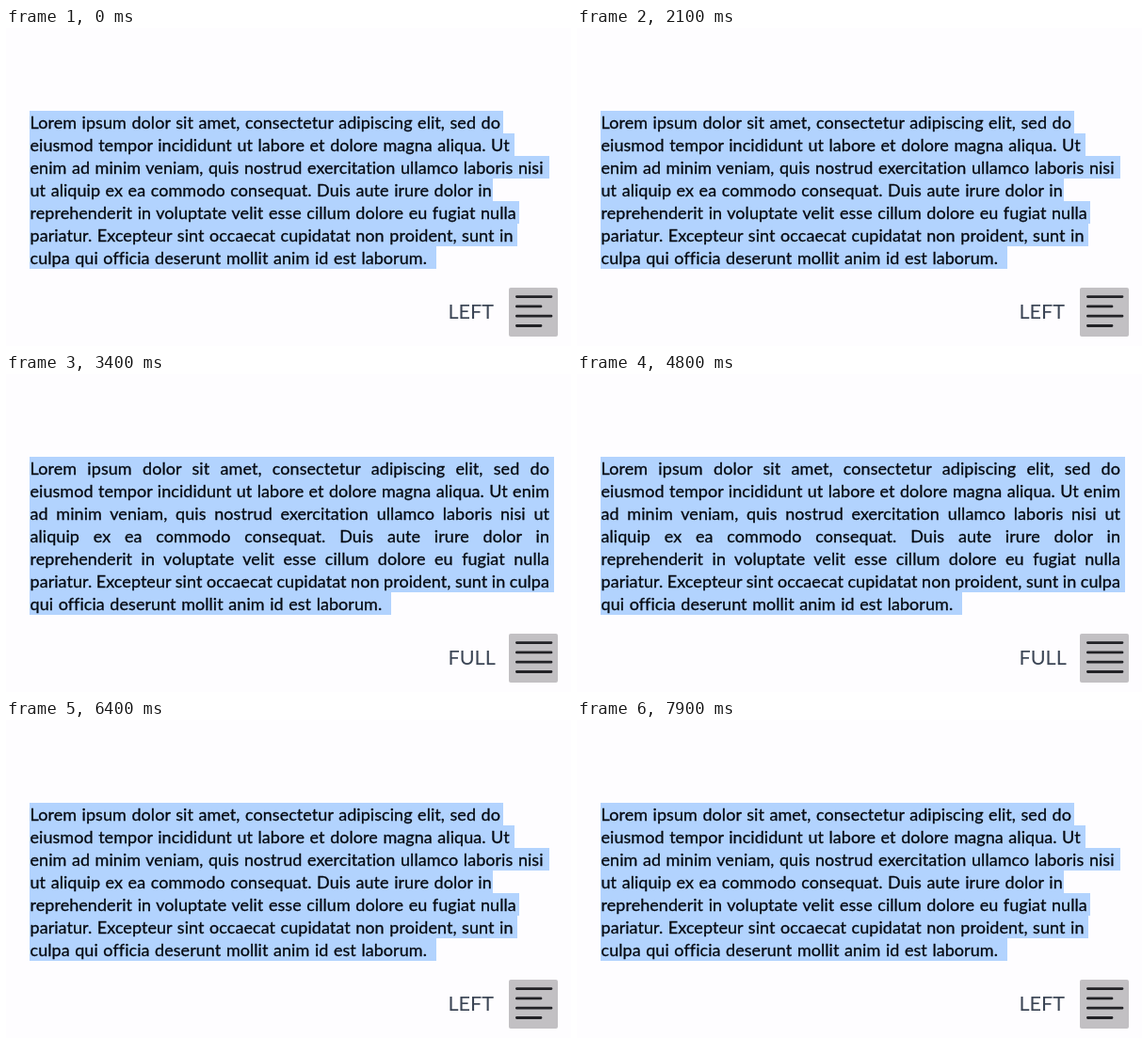
These frames come from a looping animation (600 px wide and 338 px high, 8000 ms). An HTML page:

```html
<!DOCTYPE html>
<html lang="en">
<head>
<meta charset="utf-8">
<title>Text alignment</title>
<style>
html, body { margin: 0; width: 100%; height: 100%; overflow: hidden; background: #fefdff; }
#stage { position: relative; width: 600px; height: 338px; }
.line {
  position: absolute; left: 25px; height: 24px; padding-left: .5px; box-sizing: border-box;
  background: #b2d3fe; color: #060a12; white-space: nowrap;
  font: 18px/24px Lato, sans-serif; letter-spacing: .05px; word-spacing: .9px;
  -webkit-text-stroke: .3px #060a12;
}
.line span { display: block; }
.justify span { width: 551.5px; text-align-last: justify; word-spacing: -3px; }
#label { position: absolute; left: 469.5px; top: 288px; font: 21.6px/27px Lato, sans-serif; color: #3b4555; }
svg { position: absolute; left: 534px; top: 276px; }
</style>
</head>
<body>
<div id="stage">
  <div id="text"></div>
  <div id="label"></div>
  <svg width="52" height="52">
    <rect width="52" height="52" rx="2" fill="#c2c0c3"/>
    <path id="bars" stroke="#222226" stroke-width="2.8" stroke-linecap="round"/>
  </svg>
</div>
<script>
const $ = id => document.getElementById(id);
const words = ("Lorem ipsum dolor sit amet, consectetur adipiscing elit, sed do eiusmod tempor " +
  "incididunt ut labore et dolore magna aliqua. Ut enim ad minim veniam, quis nostrud exercitation " +
  "ullamco laboris nisi ut aliquip ex ea commodo consequat. Duis aute irure dolor in reprehenderit " +
  "in voluptate velit esse cillum dolore eu fugiat nulla pariatur. Excepteur sint occaecat cupidatat " +
  "non proident, sunt in culpa qui officia deserunt mollit anim id est laborum.").split(" ");

// Words per line and right edge of each highlight
const modes = {
  LEFT: { counts: [10, 10, 10, 11, 10, 9, 9], ends: [528, 540, 577, 517, 545, 543, 457], short: 34 },
  FULL: { counts: [10, 11, 10, 10, 10, 10, 8], ends: [582, 582, 582, 582, 582, 582, 409], short: 45 }
};

function show(name) {
  const { counts, ends, short } = modes[name];
  let at = 0;
  $("text").innerHTML = counts.map((n, i) => {
    const line = words.slice(at, at += n).join(" ");
    const justify = name === "FULL" && i < 6 ? " justify" : "";
    return `<div class="line${justify}" style="top:${88 + 24 * i}px;width:${ends[i] - 25}px"><span>${line}</span></div>`;
  }).join("");
  $("label").textContent = name;
  $("bars").setAttribute("d", [45, short, 45, short].map((x, i) => `M8.4 ${9.6 + 10.3 * i}H${x}`).join(""));
}

let current;
function frame(now) {
  const t = now % 8000;
  const name = t >= 3400 && t < 6400 ? "FULL" : "LEFT";
  if (name !== current) show(current = name);
  requestAnimationFrame(frame);
}
frame(performance.now());
</script>
</body>
</html>
```
